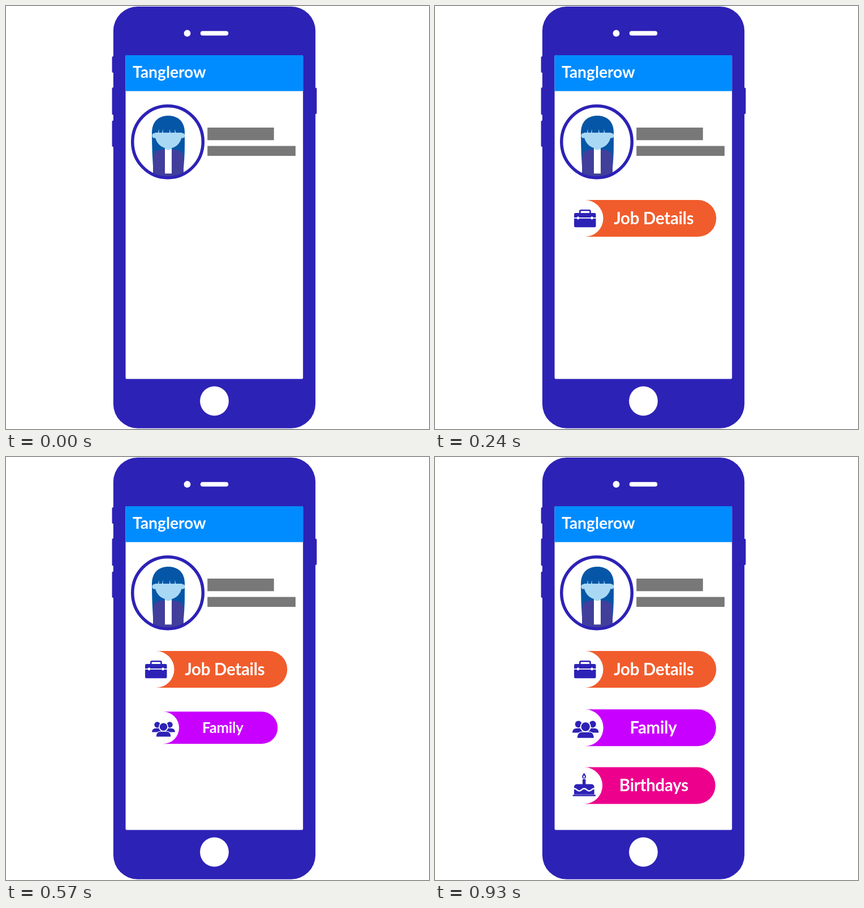
Recreate the animation shown at these times as an HTML page with a canvas. Size 748 px wide and 748 px high, loop 1800 ms.

```html
<!DOCTYPE html>
<html lang="en">
<head>
<meta charset="utf-8">
<title>Contact profile</title>
<style>
  html, body { margin: 0; width: 100%; height: 100%; overflow: hidden; background: #fff; }
  canvas { display: block; width: 748px; height: 748px; }
</style>
</head>
<body>
<canvas id="stage"></canvas>
<script>
const SIZE = 748, LOOP = 1800, STEP = 30, GROW = 240;
const INDIGO = '#2d22b6', WHITE = '#fff';
const FONT = 'Lato, "Open Sans", sans-serif';

const canvas = document.getElementById('stage');
const ratio = window.devicePixelRatio || 1;
canvas.width = canvas.height = Math.round(SIZE * ratio);
const ctx = canvas.getContext('2d');

function box(x1, y1, x2, y2, color, radius = 0) {
  ctx.fillStyle = color;
  ctx.beginPath();
  ctx.roundRect(x1, y1, x2 - x1, y2 - y1, radius);
  ctx.fill();
}

function oval(x, y, rx, ry, color) {
  ctx.fillStyle = color;
  ctx.beginPath();
  ctx.ellipse(x, y, rx, ry, 0, 0, Math.PI * 2);
  ctx.fill();
}

function shape(d, color) {
  ctx.fillStyle = color;
  ctx.fill(new Path2D(d));
}

function label(text, x, y, size, align, spacing = 0) {
  ctx.font = `bold ${size}px ${FONT}`;
  ctx.textAlign = align;
  ctx.textBaseline = 'alphabetic';
  ctx.letterSpacing = spacing + 'px';
  ctx.fillStyle = WHITE;
  ctx.fillText(text, x, y);
}

function drawPhone() {
  for (const [top, bottom] of [[89, 118], [144, 192.5], [202.5, 249]]) {
    box(187.5, top, 194, bottom, INDIGO, 2);
  }
  box(543, 144.5, 549.5, 191, INDIGO, 2);
  box(189.8, 1, 547.2, 746.7, INDIGO, 43);
  oval(320.5, 48.2, 5.9, 6, WHITE);
  box(343.8, 44.2, 393.2, 52.3, WHITE, 4);
  oval(368.5, 698.5, 25.4, 26, WHITE);
  box(211.5, 87, 525.2, 659.5, WHITE, 2);
  box(211.5, 87, 525.2, 150.5, '#008cff', [2, 2, 0, 0]);
  label('Tanglerow', 224, 127.3, 28.2, 'left');
}

function drawAvatar() {
  const hair = '#0556a6', skin = '#a9d8f4', jacket = '#413f9b';
  ctx.save();
  ctx.beginPath();
  ctx.ellipse(286, 240.2, 61, 62.2, 0, 0, Math.PI * 2);
  ctx.clip();
  shape('M258 224C258 204 270 194 287 194S316 204 316 224V246Q316 270 313 296H261Q258 262 258 224Z', hair);
  shape('M260 304V268Q261 255 274 254H300Q313 256 314 268V304Z', jacket);
  shape('M280.5 304V253H293.5V304Z', jacket);
  box(281, 252, 293, 296.3, WHITE);
  shape('M281 246H293V252Q287 257 281 252Z', skin);
  oval(262.3, 229.3, 3.8, 4.2, skin);
  oval(312.2, 229.3, 3.8, 4.2, skin);
  shape('M263 224H311.5C311.5 241 301 251.8 287.3 251.8S263 241 263 224Z', skin);
  for (const [x, lean] of [[269.5, 1], [276.8, .6], [290, -.6], [299.5, -1]]) {
    shape(`M${x - 1} 224.5L${x + lean} 217.5L${x + 1} 224.5Z`, skin);
  }
  ctx.restore();
  ctx.strokeStyle = INDIGO;
  ctx.lineWidth = 5.5;
  ctx.beginPath();
  ctx.ellipse(286, 240.2, 62.3, 63.5, 0, 0, Math.PI * 2);
  ctx.stroke();
  box(356.2, 215, 473.8, 237.2, '#787878');
  box(356.2, 247.5, 512, 265, '#787878');
}

function drawBriefcase() {
  ctx.strokeStyle = INDIGO;
  ctx.lineWidth = 2.6;
  ctx.beginPath();
  ctx.roundRect(256.3, 361.2, 18.2, 9, 2);
  ctx.stroke();
  box(246, 366, 284.5, 374, INDIGO, [2.5, 2.5, 0, 0]);
  box(246, 375.8, 284.5, 391.2, INDIGO, [0, 0, 2.5, 2.5]);
  box(251.2, 372.6, 254.8, 377.2, WHITE, 1);
  box(275.7, 372.6, 279.3, 377.2, WHITE, 1);
}

function drawPeople() {
  for (const [x, side] of [[253.6, -1], [278.8, 1]]) {
    oval(x, 472.6, 5.9, 6, INDIGO);
    const outer = 266.2 + side * 23.2, inner = 266.2 + side * 5;
    shape(`M${outer} 487.5Q${outer} 479.8 ${outer - side * 8} 479.8H${inner}V487.5Z`, INDIGO);
  }
  oval(266.2, 477, 9.6, 9.8, WHITE);
  oval(266.2, 477, 7.7, 7.8, INDIGO);
  shape('M250.2 498C250.2 489 254 485.5 260 485.5H272.4C278.4 485.5 282.2 489 282.2 498Z', WHITE);
  shape('M251.8 496.8C251.8 490 255 486.8 260 486.8H272.4C277.4 486.8 280.7 490 280.7 496.8Z', INDIGO);
}

function drawCake() {
  shape('M263.6 558.8Q267 563 267 565.3A3.4 3.4 0 0 1 260.2 565.3Q260.2 563 263.6 558.8Z', INDIGO);
  shape('M263.6 562.5Q265 565 265 566A1.4 1.4 0 0 1 262.2 566Q262.2 565 263.6 562.5Z', WHITE);
  box(260.9, 569.8, 266.4, 581, INDIGO, 0.5);
  box(246, 578.5, 281.6, 596.8, INDIGO, [5, 5, 0, 0]);
  ctx.strokeStyle = WHITE;
  ctx.lineWidth = 2.4;
  ctx.beginPath();
  for (let x = 245.8; x <= 281.8; x += 0.5) {
    ctx.lineTo(x, 588.4 - 2 * Math.cos((x - 263.8) * Math.PI * 2 / 17.5));
  }
  ctx.stroke();
  box(243.6, 597.2, 284, 599.8, INDIGO, 0.5);
}

const buttons = [
  { text: 'Job Details', start: 0, color: '#f15c2c', cx: 364.8, cy: 375.5,
    left: 265, right: 497.4, textX: 386.8, base: 386, icon: drawBriefcase },
  { text: 'Family', start: 360, color: '#c800ff', cx: 364.6, cy: 478.8,
    left: 265.2, right: 497, textX: 386, base: 489.2, icon: drawPeople },
  { text: 'Birthdays', start: 690, color: '#ec008c', cx: 363.2, cy: 581,
    left: 263.6, right: 495.8, textX: 386.8, base: 591.3, icon: drawCake }
];

function drawButton(b, time) {
  const scale = Math.min(1, (time - b.start) / GROW);
  if (scale <= 0) return;
  const r = 32.5;
  ctx.save();
  ctx.translate(b.cx, b.cy);
  ctx.scale(scale, scale);
  ctx.translate(-b.cx, -b.cy);
  ctx.fillStyle = b.color;
  ctx.beginPath();
  ctx.arc(b.right - r, b.cy, r, -Math.PI / 2, Math.PI / 2);
  ctx.arc(b.left, b.cy, r, Math.PI / 2, -Math.PI / 2, true);
  ctx.fill();
  b.icon();
  label(b.text, b.textX, b.base, 29.5, 'center', -0.3);
  ctx.restore();
}

function draw(now) {
  const time = Math.floor((now % LOOP) / STEP) * STEP;
  ctx.setTransform(ratio, 0, 0, ratio, 0, 0);
  ctx.fillStyle = WHITE;
  ctx.fillRect(0, 0, SIZE, SIZE);
  drawPhone();
  drawAvatar();
  for (const b of buttons) drawButton(b, time);
}

let origin;
function tick(now) {
  origin ??= now;
  draw(Math.max(0, now - origin));
  requestAnimationFrame(tick);
}
draw(0);
requestAnimationFrame(tick);
</script>
</body>
</html>
```
